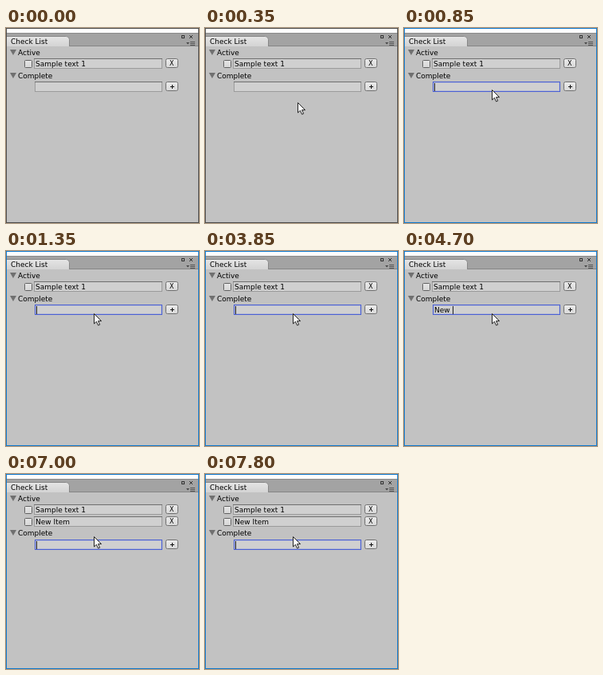
These frames come from a looping animation (242x244 px, 8 s). An HTML page with a canvas:

```html
<!DOCTYPE html>
<html lang="en">
<head>
<meta charset="utf-8">
<title>Check List</title>
<style>
  html, body { margin: 0; width: 100%; height: 100%; overflow: hidden; background: #c2c2c2; }
  canvas { display: block; width: 242px; height: 244px; }
</style>
</head>
<body>
<canvas id="stage"></canvas>
<script>
const W = 242, H = 244, LOOP = 8000;
const FOCUS_AT = 850, ADD_AT = 7000;
const FONT = '"DejaVu Sans", sans-serif';
const canvas = document.getElementById('stage');
const ratio = window.devicePixelRatio || 1;
canvas.width = Math.round(W * ratio);
canvas.height = Math.round(H * ratio);
const ctx = canvas.getContext('2d');
ctx.scale(ratio, ratio);

// [start time, value]
const pointerSteps = [[0, null], [200, [170, 157]], [350, [116, 93]], [500, [112, 81]],
  [700, [110, 77]], [1300, [110, 78]]];
const typedSteps = [[0, ''], [4200, 'N'], [4500, 'New'], [4700, 'New '], [4850, 'New I'],
  [5050, 'New It'], [5250, 'New Ite'], [5450, 'New Item'], [ADD_AT, '']];

const valueAt = (steps, t) => steps.filter(([start]) => start <= t).pop()[1];

function rect(x, y, w, h, color) {
  ctx.fillStyle = color;
  ctx.fillRect(x, y, w, h);
}

function frame(x, y, w, h, color) {
  ctx.strokeStyle = color;
  ctx.lineWidth = 1;
  ctx.strokeRect(x + .5, y + .5, w - 1, h - 1);
}

function shape(points, fill, stroke) {
  ctx.beginPath();
  points.forEach(([x, y]) => ctx.lineTo(x, y));
  ctx.closePath();
  ctx.fillStyle = fill;
  ctx.fill();
  if (stroke) {
    ctx.strokeStyle = stroke;
    ctx.lineWidth = 1;
    ctx.stroke();
  }
}

function text(str, x, y, size = 9) {
  ctx.font = `${size}px ${FONT}`;
  ctx.fillStyle = '#000';
  ctx.fillText(str, x, y);
}

function rounded(x, y, w, h, radii, top, bottom, stroke) {
  const fill = ctx.createLinearGradient(0, y, 0, y + h);
  fill.addColorStop(0, top);
  fill.addColorStop(1, bottom);
  ctx.beginPath();
  ctx.roundRect(x + .5, y + .5, w - 1, h - 1, radii);
  ctx.fillStyle = fill;
  ctx.fill();
  ctx.strokeStyle = stroke;
  ctx.lineWidth = 1;
  ctx.stroke();
}

function windowChrome(focused) {
  rect(0, 0, W, H, '#c2c2c2');
  rect(0, 0, W, 6, '#fff');
  rect(1, 6, W - 2, 17, '#a3a3a3');
  rect(1, 6, W - 2, 1, '#8c8c8c');
  rect(1, 22, W - 2, 1, '#868686');

  rounded(0, 10, 80, 14, [0, 4, 0, 0], '#e6e6e6', '#d2d2d2', '#888');
  rect(1, 23, W - 2, 1, '#c2c2c2');
  text('Check List', 6, 20);

  frame(220, 9, 4, 4, '#333');
  ctx.beginPath();
  ctx.moveTo(230, 9);
  ctx.lineTo(234, 13);
  ctx.moveTo(234, 9);
  ctx.lineTo(230, 13);
  ctx.strokeStyle = '#333';
  ctx.stroke();
  shape([[226, 18], [230, 18], [228, 20.5]], '#444');
  for (let y = 17; y < 22; y += 2) rect(231, y, 6, 1, '#555');

  frame(0, 0, W, H, focused ? '#0f78cc' : '#4c4c4c');
}

function heading(label, y) {
  shape([[5, y - 7], [13, y - 7], [9, y]], '#707070');
  text(label, 15, y);
}

function field(x, y, w, focused) {
  rect(x, y, w, 13, '#d0d0d0');
  if (focused) {
    frame(x, y, w, 13, '#4a60d4');
    frame(x + 1, y + 1, w - 2, 11, 'rgba(74, 96, 212, .2)');
  } else {
    frame(x, y, w, 13, '#9b9b9b');
    rect(x, y, w, 1, '#6f6f6f');
  }
}

function button(y) {
  rounded(200, y, 16, 12, 2, '#ececec', '#d8d8d8', '#707070');
}

function item(label, y) {
  rounded(23, y + 2, 10, 10, 1, '#e6e6e6', '#d6d6d6', '#626262');
  field(35, y, 161, false);
  text(label, 37, y + 10);
  button(y);
  text('X', 205, y + 9, 8);
}

function entry(typed, y, focused) {
  field(36, y, 160, focused);
  text(typed, 38, y + 10);
  if (focused) rect(38 + Math.ceil(ctx.measureText(typed).width), y + 2, 1, 10, '#222');
  button(y);
  rect(206, y + 6, 5, 1, '#111');
  rect(208, y + 4, 1, 5, '#111');
}

function pointer([x, y]) {
  const outline = [[.5, .5], [.5, 13], [3.4, 10.3], [5.6, 15], [7.6, 14.2], [5.5, 9.6], [9.6, 9.6]];
  shape(outline.map(([px, py]) => [x + px, y + py]), '#fff', '#222');
}

function draw(t) {
  const focused = t >= FOCUS_AT;
  const added = t >= ADD_AT;

  windowChrome(focused);
  heading('Active', 34);
  item('Sample text 1', 38);
  if (added) item('New Item', 53);
  heading('Complete', added ? 77 : 63);
  entry(valueAt(typedSteps, t), added ? 82 : 67, focused);

  const position = valueAt(pointerSteps, t);
  if (position) pointer(position);
}

const start = performance.now();
function tick() {
  draw((performance.now() - start) % LOOP);
  requestAnimationFrame(tick);
}
tick();
</script>
</body>
</html>
```
